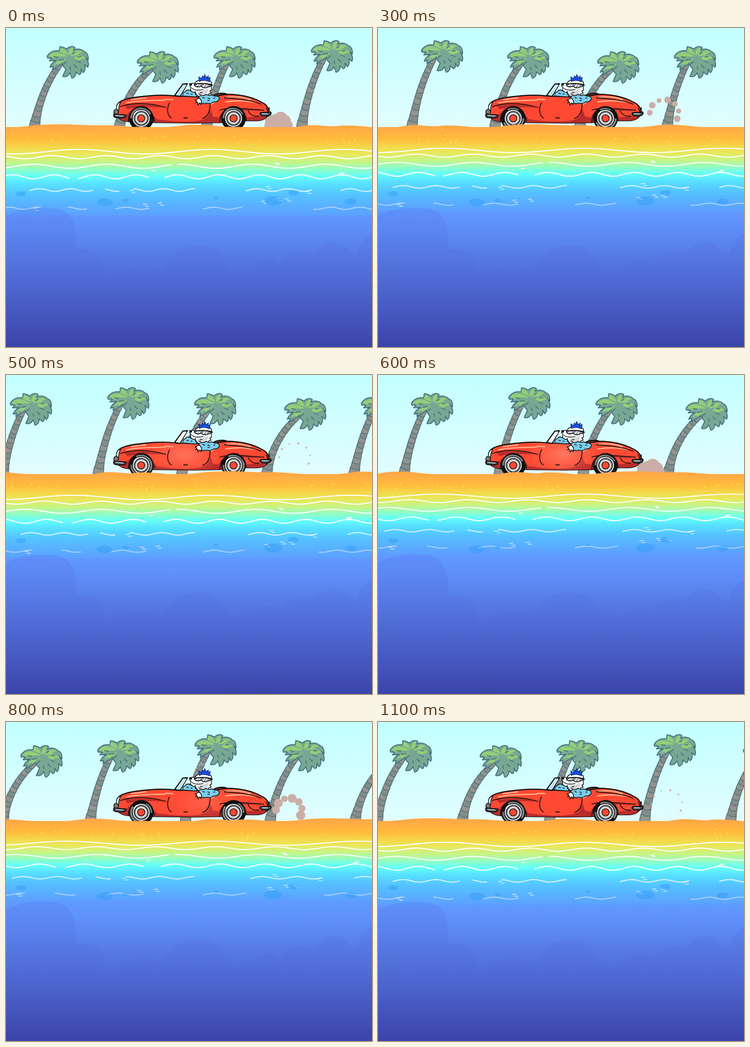
Animation, 801 px wide and 699 px high, one loop 1200 ms. Source, as an HTML page:

```html
<!DOCTYPE html>
<html lang="en">
<head>
<meta charset="utf-8">
<title>Beach drive</title>
<style>
  html, body { margin: 0; width: 100%; height: 100%; overflow: hidden; background: #c4ffff; }
  svg { display: block; width: 100vw; height: 100vh; }
  .ink { stroke: #111; stroke-width: 2.4; stroke-linejoin: round; stroke-linecap: round; }
  .thin { stroke: #111; stroke-width: 1.6; stroke-linejoin: round; }
  .line { fill: none; stroke: #111; stroke-width: 1.8; stroke-linecap: round; }
  .shine { fill: none; stroke: #ffb58d; stroke-width: 2.6; stroke-linecap: round; }
  .wave { fill: none; stroke: #fff; stroke-width: 2.4; stroke-linecap: round; }
</style>
</head>
<body>
<svg viewBox="0 0 801 699" preserveAspectRatio="none">
  <defs>
    <linearGradient id="sky" x2="0" y2="1">
      <stop stop-color="#c2ffff"/><stop offset="1" stop-color="#e2fdff"/>
    </linearGradient>
    <linearGradient id="sea" gradientUnits="userSpaceOnUse" x1="0" x2="0" y1="390" y2="699">
      <stop stop-color="#609cff"/><stop offset=".14" stop-color="#5f90fa"/>
      <stop offset=".42" stop-color="#5475dc"/><stop offset=".74" stop-color="#4759c2"/>
      <stop offset="1" stop-color="#3b43a6"/>
    </linearGradient>
    <linearGradient id="shore" gradientUnits="userSpaceOnUse" x1="0" x2="0" y1="217" y2="411">
      <stop stop-color="#ffa946"/><stop offset=".14" stop-color="#ffbc3b"/>
      <stop offset=".23" stop-color="#f4d84b"/><stop offset=".31" stop-color="#e8e95e"/>
      <stop offset=".4" stop-color="#c4f58a"/><stop offset=".47" stop-color="#96fcc0"/>
      <stop offset=".55" stop-color="#66fff6"/><stop offset=".64" stop-color="#58e2ff"/>
      <stop offset=".77" stop-color="#55c2ff"/><stop offset="1" stop-color="#5d9fff"/>
    </linearGradient>
    <linearGradient id="deep" x2="0" y2="1">
      <stop stop-color="#5878f0" stop-opacity=".32"/><stop offset="1" stop-color="#4050b4" stop-opacity=".08"/>
    </linearGradient>
    <radialGradient id="gloss">
      <stop stop-color="#ff8a72" stop-opacity=".75"/><stop offset="1" stop-color="#ff6a50" stop-opacity="0"/>
    </radialGradient>
    <path id="body" d="M243 170C245 161 258 156 282 152C318 147 348 146 371 149L452 152C470 146 485 144 500 146C527 148 548 156 562 164C572 169 576 178 574 189C571 198 563 202 550 203L522 203L468 207L410 208L328 207L268 205C252 204 241 196 242 185Z"/>
    <clipPath id="bodyClip"><use href="#body"/></clipPath>
    <g id="crown">
      <path fill="#78a793" stroke="#45707d" stroke-width="2" stroke-linejoin="round" d="M0 22C6 12 16 8 27 10L28 1C36 1 40 5 43 6C48 0 57-1 61 3L58 8C68 4 78 7 81 12C87 13 91 20 90 30L84 24C90 32 92 40 89 46L82 40C85 48 83 54 79 58L74 50C76 58 73 62 70 62L63 56C64 63 60 69 54 70L50 58C46 66 40 68 34 66L41 50C36 46 34 42 33 38C28 42 20 46 12 51L13 44L6 46C9 38 14 34 20 31L5 32L10 26L1 26Z"/>
      <path fill="#93ce78" d="M3 21C12 11 24 10 44 22C34 24 24 20 15 27L10 24ZM30 3C39 5 42 12 46 20C38 16 32 14 27 12ZM47 20C45 10 50 2 58 3L56 9C56 15 53 18 47 20ZM51 22C58 10 70 7 79 13C72 13 70 18 66 20ZM58 26C68 18 78 20 86 27C78 26 74 30 68 32ZM14 43C18 33 28 28 42 27C36 33 32 34 26 40L22 38Z"/>
      <path fill="none" stroke="#45707d" stroke-width="1.8" stroke-linecap="round" d="M15 23L24 24M25 31L36 29M36 39L42 34M50 45L51 51M59 41L65 47M65 32L74 36M67 23L74 23M56 17L61 13"/>
    </g>
    <g id="wheel">
      <circle r="27" fill="#111"/>
      <g class="tyre">
        <path d="M-24 0A24 24 0 0 1 22-10L0 0Z" fill="#858585"/>
        <path d="M-13 20A24 24 0 0 0 13 20L0 0Z" fill="#777"/>
      </g>
      <circle r="19.5" fill="#cfd2d4" class="thin"/>
      <circle r="15" fill="#85898d" class="thin"/>
      <circle r="12.5" fill="#d9dcde"/>
      <circle r="8" fill="#ff4933" class="thin"/>
      <path d="M-16-8A18 18 0 0 1 -8-16" fill="none" stroke="#fff" stroke-width="2.5"/>
    </g>
    <path id="ground" fill="#ffa946" d="M0 218L25 217C55 215 70 211 115 211C155 211 180 214 210 213C245 213 260 216 285 217L355 217C385 215 390 211 420 212C450 212 465 216 490 217L635 217C655 214 660 212 678 213C700 214 710 216 724 215C742 212 770 214 797 217L816 218V219H0Z"/>
  </defs>

  <rect width="801" height="220" fill="url(#sky)"/>
  <g id="palmsA"></g>
  <g id="palmsB"></g>
  <g id="smoke" fill="#cbaea7"></g>

  <g id="car">
    <path fill="#7b3826" class="ink" d="M452 150C457 143 478 140 487 147L478 154Z"/>
    <use href="#body" fill="#ff4933" class="ink"/>
    <g clip-path="url(#bodyClip)">
      <path fill="#b92c2c" d="M245 192C256 196 265 190 272 182C284 171 310 172 319 187L330 200L355 203C395 207 430 206 442 194L447 176L453 194L466 196C472 176 509 169 522 185L528 196L554 193L574 197V212H245ZM260 171C290 166 321 167 346 175C318 172 290 172 266 178ZM470 179C488 171 522 176 565 180C530 184 496 176 470 179Z"/>
      <ellipse id="glare" rx="85" ry="48" cy="174" fill="url(#gloss)"/>
    </g>
    <path class="shine" d="M264 164C290 158 325 159 348 158M274 157L306 153M349 156L365 157M482 152C502 149 521 152 535 157M481 162C510 157 532 161 546 163M448 167L459 161"/>
    <path class="line" d="M250 172C280 163 314 164 350 174M358 164C351 176 353 193 362 197M447 166C446 183 442 195 430 198M389 197H397M468 180C488 173 520 177 564 180M478 153C508 155 538 158 558 167M530 181C534 191 543 194 553 193"/>
    <use href="#wheel" x="296" y="198"/>
    <use href="#wheel" x="498" y="198"/>
    <path class="line" d="M268 205C267 165 319 161 325 205M468 207C469 165 518 162 526 203"/>
    <path fill="#d9f2f7" class="thin" d="M242 181C240 169 245 163 251 163C246 170 247 177 246 183Z"/>
    <ellipse cx="241" cy="184" rx="5" ry="6" fill="#777" class="thin"/>
    <path fill="#555d66" class="ink" d="M237 188C246 191 255 189 262 191C264 197 254 198 240 196C235 195 235 190 237 188ZM557 186C566 183 574 187 579 184C582 188 578 193 567 193C559 193 554 190 557 186Z"/>
    <path fill="#e24a3a" class="thin" d="M569 174L573 184L576 174L577 185"/>
    <path d="M240 191L257 193M560 188L573 188" stroke="#bbc4ca" stroke-width="2"/>

    <path fill="#79cceb" class="thin" d="M387 149C386 142 390 140 393 139C395 135 401 135 404 138C410 135 416 139 418 148L416 151Z"/>
    <path fill="#fff" class="thin" d="M402 126C402 121 409 121 414 121C417 114 427 112 437 114C445 112 452 118 449 125C451 129 448 133 450 136L446 138L449 143L444 144L442 150L422 151L417 146L414 141C407 142 402 137 405 131Z"/>
    <path fill="#d3d5d9" d="M418 139C425 142 434 137 443 132L440 145L424 149Z"/>
    <path class="thin" fill="none" d="M407 132C414 138 424 136 432 135M424 141H430M421 145H427M414 138L415 147"/>
    <path fill="#111" d="M401 121H407V126H402Z"/>
    <path fill="#8d929a" class="thin" d="M412 124C421 121 440 121 451 124L448 128C443 128 442 131 438 131C432 132 429 130 427 127C421 131 413 129 412 124Z"/>
    <path d="M417 127L421 123M422 127L425 124M431 129L436 123M437 129L441 124" stroke="#fff" stroke-width="2"/>
    <path class="line" d="M412 123C424 120 440 121 452 126"/>
    <path fill="#1f50e5" stroke="#102a78" stroke-width="1.4" stroke-linejoin="round" d="M423 117L422 107L428 111L430 105L433 109L435 102L438 109L443 105L442 111L447 108L445 118C438 114 430 114 423 117Z"/>
    <path fill="#79cceb" class="thin" d="M422 151C425 145 431 150 435 147C439 143 443 150 448 147C452 145 455 151 460 149C467 150 469 156 464 159C463 164 455 160 451 164C446 168 440 163 434 166C428 166 421 160 422 151Z"/>
    <path class="thin" fill="none" d="M430 152L435 154M441 153L446 155M454 154L458 153M441 159L446 158M395 143L400 144M404 145H408"/>
    <path fill="#fff" class="thin" d="M423 153L414 158L418 160L415 164L420 163L420 169L424 164L427 168L428 160Z"/>
    <path id="glass" class="ink" d="M369 148L387 123L397 122L381 150Z"/>
    <path fill="none" stroke="#fff" stroke-width="1.7" d="M374 146L389 125M381 146L394 125"/>
    <path id="sparkle" fill="none" stroke="#fff" stroke-width="1.6" stroke-linecap="round"/>
  </g>

  <g id="hills"></g>
  <rect y="217" width="801" height="482" fill="url(#sea)"/>
  <g id="tide"></g>
  <g id="specks" fill="#ffe14e"></g>
  <g id="shoals" fill="#329cf8" opacity=".45"></g>
  <path fill="url(#deep)" d="M0 411C35 394 76 390 111 396C147 403 157 435 152 485C177 483 211 486 213 515V540C220 546 236 544 246 535C269 519 312 511 340 534C356 498 384 476 422 476C480 477 473 523 499 536C535 544 542 507 574 507C587 507 594 514 598 523C613 489 652 486 673 494C691 475 715 456 744 481C753 492 760 498 768 495C777 467 784 456 801 450V699H0Z"/>
</svg>

<script>
const byId = id => document.getElementById(id);
const repeat = (n, make) => Array.from({ length: n }, (_, i) => make(i)).join('');

let seed = 7;
function random(min, max) {
  seed = seed * 16807 % 2147483647;
  return min + (max - min) * seed / 2147483647;
}

// A palm whose trunk is a curve of overlapping bark scales, wider at the root.
function palm(x, top, lean) {
  const h = 217 - top, bendX = lean + 14, bendY = h * .54;
  const bezier = (a, b, c, u) => a * (1 - u) ** 2 + 2 * b * u * (1 - u) + c * u * u;
  const scales = 13;
  const bark = repeat(scales, i => {
    const u = 1 - i / (scales - 1);
    const cx = bezier(25, bendX, lean, u), cy = bezier(44, bendY, h - 5, u);
    const dx = (bendX - 25) * (1 - u) + (lean - bendX) * u;
    const dy = (bendY - 44) * (1 - u) + (h - bendY) * u;
    const angle = Math.atan2(dy, dx) * 180 / Math.PI - 90;
    const w = 5.5 + 2 * u + 3 * u ** 8;
    return `<path transform="translate(${cx} ${cy}) rotate(${angle})"
      d="M${-w}-9H${w}L${w + 1} 5Q${i % 2 ? 3 : -3} 11 ${-w - 1} 5Z"
      fill="${i % 2 ? '#858c88' : '#96938c'}" stroke="#4f727c" stroke-width="1.6"/>`;
  });
  return `<g transform="translate(${x} ${top})">${bark}<use href="#crown"/></g>`;
}
byId('palmsA').innerHTML = byId('palmsB').innerHTML =
  palm(90, 40, -27) + palm(287, 51, -38) + palm(455, 40, -15) + palm(668, 27, -20);

// Each row of foam is one sine, drawn only inside its spans.
const foam = [
  { y: 271, crest: 450, length: 290, height: 5, alpha: 1, spans: [[-20, 830]] },
  { y: 283, crest: 455, length: 118, height: 3.5, alpha: 1, spans: [[-20, 830]] },
  { y: 303, crest: 540, length: 160, height: 4.5, alpha: 1, spans: [[-20, 362], [377, 830]] },
  { y: 326, crest: 375, length: 90, height: 4.5, alpha: 1, spans: [[-20, 138], [158, 312], [348, 830]] },
  { y: 355, crest: 345, length: 68, height: 3, alpha: .75, spans: [[52, 190], [218, 247], [279, 413], [526, 668], [733, 830]] },
  { y: 395, crest: 455, length: 64, height: 2.5, alpha: .45, spans: [[-20, 75], [137, 176], [240, 312], [432, 516], [673, 830]] }
];
function ripple({ y, crest, length, height, alpha }, [from, to]) {
  const steps = Math.ceil((to - from) / 6);
  const points = Array.from({ length: steps + 1 }, (_, i) => {
    const x = from + (to - from) * i / steps;
    return `${x.toFixed(1)} ${(y - height * Math.cos(2 * Math.PI * (x - crest) / length)).toFixed(1)}`;
  });
  return `<path class="wave" d="M${points.join('L')}" opacity="${alpha}"/>`;
}
const glint = () => {
  const x = random(60, 790), y = random(345, 400);
  return `<path class="wave" d="M${x} ${y}l7-1m-2 5l6 0" opacity=".55"/>`;
};
byId('tide').innerHTML = '<rect x="-20" y="217" width="850" height="194" fill="url(#shore)"/>' +
  foam.map(row => row.spans.map(span => ripple(row, span)).join('')).join('') + repeat(9, glint) +
  '<path class="wave" d="M320 313l6-1M590 296h6m-3 3h5M729 321h6m-3-3l8-1m-6 5h6"/>';

const SAND_WIDTH = 814;
const tiled = mark => mark + `<g transform="translate(${-SAND_WIDTH} 0)">${mark}</g>`;
byId('hills').innerHTML = tiled('<use href="#ground"/>');
byId('specks').innerHTML = tiled(repeat(28, () =>
  `<circle cx="${random(0, SAND_WIDTH)}" cy="${random(234, 256)}" r="1.6"/>`));

byId('shoals').innerHTML =
  [[33, 363, 11], [216, 382, 17], [262, 378, 7], [460, 372, 5], [585, 379, 20], [629, 361, 12], [754, 380, 13]]
    .map(([x, y, r]) => `<ellipse cx="${x}" cy="${y}" rx="${r}" ry="${r * .5}"/>`).join('');

// A ring of blobs that rises, widens and shrinks.
function smoke(age) {
  const ease = 1 - (1 - age / 5) ** 2;
  const cx = 597 + 35 * ease, cy = 215 - 35 * ease, ring = 17 + 14 * ease;
  const core = `<circle cx="${cx}" cy="${cy}" r="${Math.max(0, 20 - 10 * age)}"/>`;
  return core + repeat(7, i => {
    const angle = Math.PI * (1 + i * 1.15 / 6);
    const r = (13 - 2.2 * age) * (1 + .18 * Math.sin(i * 2.4));
    return `<circle cx="${cx + ring * 1.1 * Math.cos(angle)}" cy="${cy + ring * Math.sin(angle)}" r="${r}"/>`;
  });
}

// Short rays around the hat that fly out and fade to dots.
const sparkle = age => repeat(8, i => {
  const angle = -Math.PI * (.82 - i * .11);
  const at = r => `${435 + r * Math.cos(angle)} ${112 + r * Math.sin(angle)}`;
  const inner = 15 + 3 * age;
  return `M${at(inner)}L${at(inner + 5 - 2.2 * age)}`;
});

const shift = (id, x) => byId(id).setAttribute('transform', `translate(${x} 0)`);
const tyres = document.querySelectorAll('.tyre');

function draw(step) {
  shift('palmsA', 64.5 * step);
  shift('palmsB', -764 + 63.67 * step);
  const sand = 74 * step % SAND_WIDTH;
  shift('hills', sand);
  shift('specks', sand);

  const rise = .05 * (2 - Math.abs(2 - Math.floor(step / 3)));
  byId('tide').setAttribute('transform',
    `translate(430 217) scale(${1 + rise} ${1 - rise}) translate(-430 -217)`);

  byId('smoke').innerHTML = smoke(step % 6);
  byId('sparkle').setAttribute('d', sparkle(step % 3));
  tyres.forEach(tyre => tyre.setAttribute('transform', `rotate(${-60 * step})`));

  byId('glass').setAttribute('fill', step > 3 && step < 7 ? '#f4f4ec' : '#a2e2fb');
  const sweep = Math.min(1, Math.max(0, (step - 3) / 6));
  byId('glare').setAttribute('cx', 360 + 90 * sweep);
  byId('glare').setAttribute('opacity', Math.sin(Math.PI * sweep));
}

const start = performance.now();
function tick(now) {
  draw(Math.floor(Math.max(0, now - start) / 100) % 12);
  requestAnimationFrame(tick);
}
draw(0);
requestAnimationFrame(tick);
</script>
</body>
</html>
```
